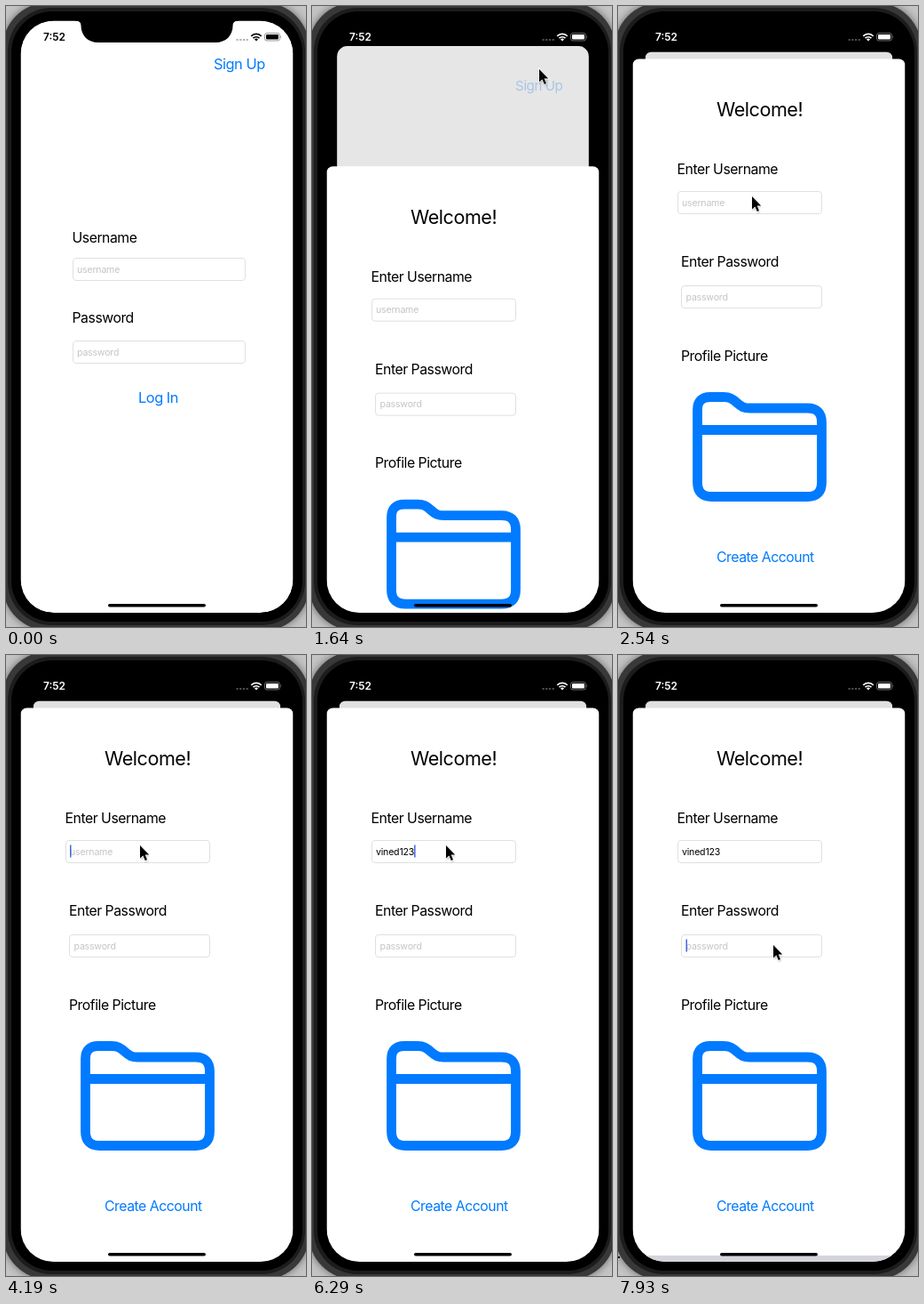
Animation of 338x698 px, one loop 8 s. Source, as an HTML page:

```html
<!DOCTYPE html>
<html lang="en">
<head>
<meta charset="utf-8">
<title>Sign up flow</title>
<style>
  html, body { margin: 0; width: 100%; height: 100%; overflow: hidden; background: #b8b8b8; }
  svg { display: block; width: 338px; height: 698px; font: 15.8px Inter, Roboto, sans-serif; letter-spacing: -.03em; }
  .blue { fill: #007aff; }
  .big { font-size: 16.4px; }
  .title { font-size: 21.6px; }
  .small { font-size: 10.6px; letter-spacing: -.02em; }
  .hint { fill: #c4c4c6; }
  .field { fill: #fff; stroke: #e0e0e0; }
  .caret { fill: #4268e0; }
  .clock { font-size: 11.9px; font-weight: 600; letter-spacing: 0; }
</style>
</head>
<body>
<svg viewBox="0 0 338 698">
  <defs>
    <clipPath id="screen"><rect x="16.5" y="16.5" width="307" height="665.5" rx="37"/></clipPath>
    <filter id="blur" x="-20%" y="-20%" width="140%" height="140%"><feGaussianBlur stdDeviation="5"/></filter>
    <filter id="soft" x="-50%" y="-50%" width="200%" height="200%"><feGaussianBlur stdDeviation="1"/></filter>
    <path id="arrow" d="M0 0V14.5L3.4 11.4L5.8 17L8 16L5.7 10.6H10.2Z"/>
  </defs>

  <!-- phone body -->
  <rect width="338" height="698" fill="#c4c4c4"/>
  <rect x="-4" y="-4" width="346" height="706" rx="52" opacity=".5" filter="url(#blur)"/>
  <rect x="-4" y="-4" width="346" height="706" rx="52" fill="#383838"/>
  <rect x="2" y="2" width="335" height="694" rx="49" fill="#1c1c1c"/>
  <rect x="6" y="6" width="328" height="686" rx="46"/>

  <g clip-path="url(#screen)">
    <g id="login">
      <rect class="page" x="16.5" y="16.5" width="307" height="665.5" fill="#fff"/>
      <text id="signUp" class="blue big" x="234" y="70.5">Sign Up</text>
      <text x="74.5" y="265.5">Username</text>
      <rect class="field" x="75.5" y="283.5" width="194" height="25" rx="3.5"/>
      <text class="small hint" x="80" y="300">username</text>
      <text x="74.5" y="355.5">Password</text>
      <rect class="field" x="75.5" y="376.5" width="194" height="25" rx="3.5"/>
      <text class="small hint" x="80" y="393">password</text>
      <text class="blue big" x="149" y="446">Log In</text>
      <rect id="dim" class="page" x="16.5" y="16.5" width="307" height="665.5"/>
    </g>

    <g id="sheet">
      <rect x="16.5" y="59.5" width="307" height="660" rx="7" fill="#fff"/>
      <text class="title" x="111" y="124">Welcome!</text>
      <text x="66.5" y="189">Enter Username</text>
      <rect class="field" x="67.5" y="208.5" width="162" height="25" rx="3.5"/>
      <text id="nameHint" class="small hint" x="72" y="224.5">username</text>
      <g id="suggest">
        <rect x="70" y="213" width="28.5" height="15" fill="#c8d6e8"/>
        <path d="M70.5 228.5H107a7.75 7.75 0 0 1 0 15.5H73.5a3 3 0 0 1-3-3Z" fill="#fff" stroke="#d6d6d6"/>
        <text class="small blue" x="72" y="240">mined</text>
        <path d="M103 233.2l6.4 6.4m0-6.4l-6.4 6.4" stroke="#b4b4b8"/>
      </g>
      <text id="name" class="small" x="72" y="224.5"></text>
      <text x="71" y="293">Enter Password</text>
      <rect class="field" x="71.5" y="314.5" width="158" height="25" rx="3.5"/>
      <text class="small hint" x="76.5" y="330.5">password</text>
      <rect id="caret" class="caret" width="1.5" height="14"/>
      <text x="71" y="398.5">Profile Picture</text>
      <path d="M89.5 476.5H229.5M89.5 456V454q0-14.5 14.5-14.5H119c7 0 10 2 15 6.500s8 6 14 6H213.500q16 0 16 16V535.500q0 16-16 16H105.500q-16 0-16-16Z"
            fill="none" stroke="#007aff" stroke-width="10.8"/>
      <text class="blue" x="111" y="625">Create Account</text>
    </g>
    <rect id="keys" x="16" y="675" width="308" height="8" fill="#d4d5dc"/>
  </g>

  <rect id="speck" y="676" width="2" height="2"/>
  <path d="M78 15.500V16.500Q84.500 16.500 84.500 22C84.500 33 92 41 104 41H236C248 41 255.500 33 255.500 22Q255.500 16.500 262 16.500V15.500Z"/>
  <rect x="115" y="672" width="110" height="3.600" rx="1.800"/>

  <g id="status" fill="currentColor">
    <text class="clock" x="42" y="39">7:52</text>
    <path d="M259.500 38H273" stroke="currentColor" stroke-width="2.200" stroke-dasharray="2.200 1.500" opacity=".3"/>
    <g fill="none" stroke="currentColor" stroke-width="1.700">
      <path d="M276.300 33.900a7.800 7.800 0 0 1 11.400 0M278.500 36.200a4.900 4.900 0 0 1 7 0"/>
    </g>
    <path d="M282 39.600l-2-2.100a2.900 2.900 0 0 1 4 0Z"/>
    <rect x="291.500" y="30.500" width="17" height="8.500" rx="2.500" fill="none" stroke="currentColor" opacity=".4"/>
    <rect x="293" y="32" width="14" height="5.500" rx="1.200"/>
    <path d="M309.700 33.200q1.500 1.500 0 3Z" opacity=".5"/>
  </g>

  <g id="pointer">
    <use href="#arrow" x=".5" y="1.500" opacity=".4" filter="url(#soft)"/>
    <use href="#arrow" stroke="#fff" stroke-width="1.600"/>
    <use href="#arrow"/>
  </g>
</svg>

<script>
const $ = id => document.getElementById(id);
const LOOP = 8000;

// time, x, y of the pointer tip
const path = [
  [450, 281, 162], [600, 272, 120], [750, 262, 81], [900, 257, 66], [1500, 257, 66],
  [1640, 256, 71], [1790, 251, 90], [2090, 190, 172], [2240, 165, 200], [2390, 153, 212],
  [2540, 151, 214], [6740, 151, 214], [6890, 152, 222], [7030, 158, 265], [7180, 168, 318],
  [7330, 173, 341], [7480, 174, 334], [7630, 175, 328], [7780, 175, 326], [7930, 175, 326]
];

// time, typed text, caret opacity
const typing = [
  [0, "", 0], [3290, "", 1], [3890, "", .5], [4040, "", 0], [4190, "", 1],
  [4340, "v", 1], [4490, "v", .9], [4640, "vi", 1], [4940, "vine", 1], [5090, "vined", 1],
  [5840, "vined1", 1], [5990, "vined12", 1], [6290, "vined123", 1]
];

const lastBefore = (list, t) => list.filter(k => k[0] <= t).pop();
const show = (id, on) => $(id).setAttribute("opacity", +on);
const move = (id, x, y) => $(id).setAttribute("transform", `translate(${x} ${y})`);

function tick(t) {
  const lag = t < 1640 ? 0 : t < 7030 ? 10 : 20;
  return Math.floor((t + lag) / 150) * 150 - lag;
}

function pointerAt(t) {
  const a = lastBefore(path, t) || path[0];
  const b = path.find(k => k[0] > t) || a;
  const f = a === b ? 0 : Math.max(0, (t - a[0]) / (b[0] - a[0]));
  return [a[1] + (b[1] - a[1]) * f, a[2] + (b[2] - a[2]) * f];
}

function draw(time) {
  const t = tick(time);

  // critically damped spring for the sheet
  const s = Math.max(0, t - 1485) * .0198;
  const rest = (1 + s) * Math.exp(-s), p = 1 - rest;
  move("sheet", 0, 638 * rest);
  show("sheet", t >= 1500);
  $("login").setAttribute("transform",
    `translate(170 ${349 + 4 * p}) scale(${1 - .094 * p}) translate(-170 -349)`);
  for (const page of document.querySelectorAll(".page"))
    page.setAttribute("rx", 37 - 30 * p);
  show("dim", .12 * p);
  show("signUp", t < 1500 ? 1 : .28);
  $("status").style.color = p > .5 ? "#fff" : "#000";

  const [, text, blink] = lastBefore(typing, t);
  $("name").textContent = text;
  show("nameHint", !text);
  show("suggest", t >= 5390 && t < 5690);
  show("caret", blink);
  const inPassword = t >= 7930;
  if (inPassword) move("caret", 76.5, 319.5);
  else move("caret", 72 + (text ? $("name").getComputedTextLength() : 0), 213.5);
  show("keys", inPassword);
  show("speck", inPassword);

  show("pointer", t >= 450);
  move("pointer", ...pointerAt(t));
}

function frame() {
  draw(performance.now() % LOOP);
  requestAnimationFrame(frame);
}
frame();
</script>
</body>
</html>
```
